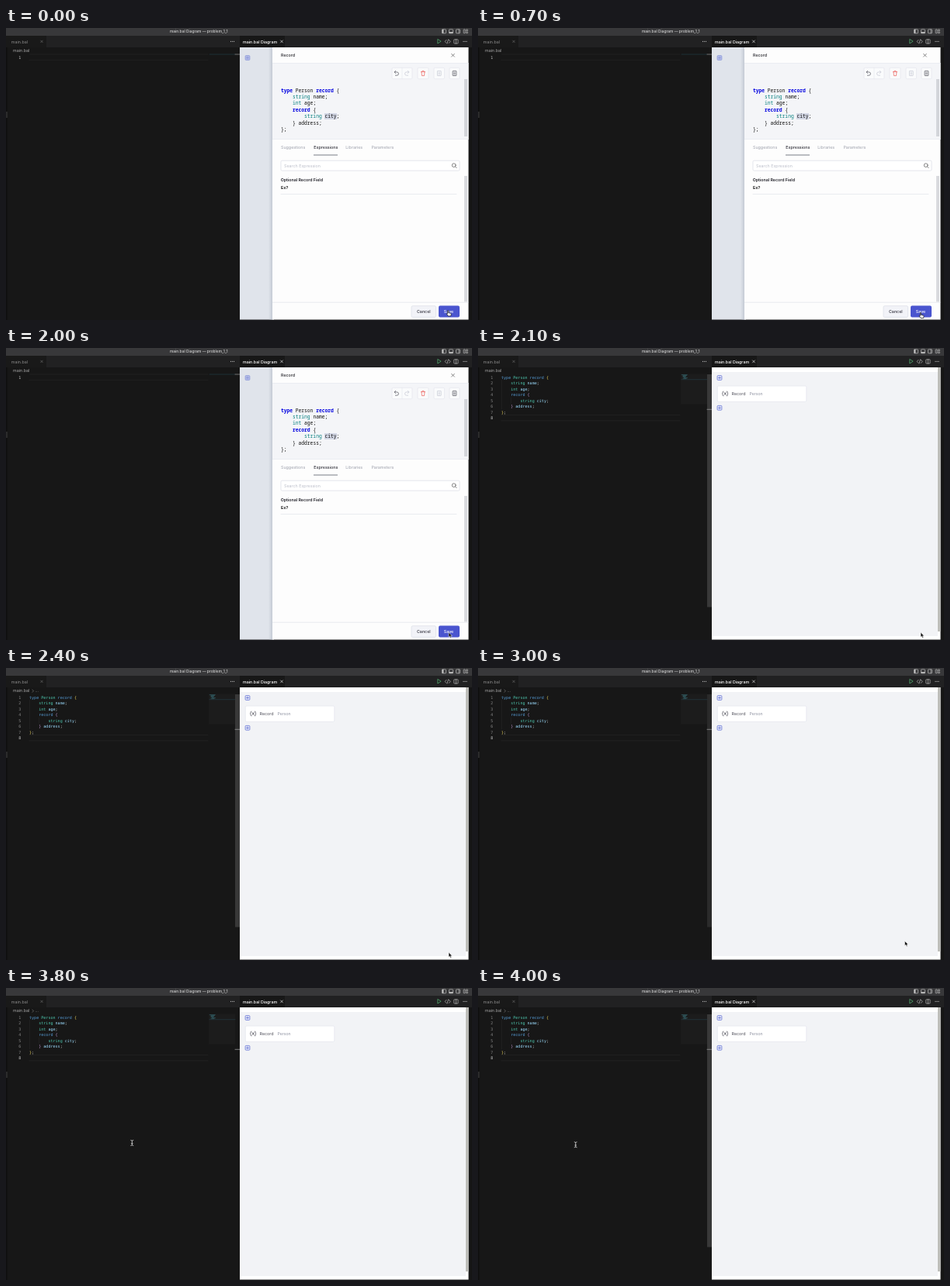
These frames come from a looping animation (600 by 377 pixels, 5200 ms). An HTML page:

```html
<!DOCTYPE html>
<html lang="en">
<head>
<meta charset="utf-8">
<title>Record editor</title>
<style>
html, body { margin: 0; width: 100%; height: 100%; overflow: hidden; background: #171717; }
svg { display: block; width: 100vw; height: 100vh; }
text { font-family: Inter, "Open Sans", sans-serif; font-size: 5.35px; white-space: pre; }
.mono { font-family: "DejaVu Sans Mono", monospace; font-size: 5.07px; }
.code { font-family: "Noto Sans Mono", monospace; font-size: 6.27px; font-weight: 500; }
.code .k { font-weight: 700; }
.med { font-weight: 500; }
.bold { font-weight: 600; }
.mid { text-anchor: middle; }
.line { fill: none; stroke-width: .7; stroke-linecap: round; stroke-linejoin: round; }
</style>
</head>
<body>
<svg viewBox="0 0 600 377" preserveAspectRatio="none">
  <defs><linearGradient id="shade"><stop stop-color="#c4cad4" stop-opacity="0"/><stop offset="1" stop-color="#c4cad4"/></linearGradient></defs>
  <g id="frame"></g>
  <g id="before"></g>
  <g id="after"></g>
  <g id="hand"><path d="M-1.6-3.4q.7-.6 1.2.2V-.6L2.3 0Q3.2.3 3 1.4L2.5 3.6H-.9L-2.8.7Q-2.7-.2-1.6.4Z" fill="#fff" stroke="#111" stroke-width=".7"/></g>
  <g id="arrow"><path d="M0 0V6L1.4 4.8 2.4 7 3.5 6.5 2.6 4.4H4.4Z" fill="#111" stroke="#fff" stroke-width=".5"/></g>
  <g id="beam"><path class="line" d="M-1.5-3.5Q0-3.4 0-2.5 0-3.4 1.5-3.5M0-2.5V2.5M-1.5 3.5Q0 3.4 0 2.5 0 3.4 1.5 3.5M-.9 .7H.9" stroke="#eee" stroke-width=".9"/></g>
</svg>
<script>
const $ = id => document.getElementById(id);
const rect = (x, y, w, h, fill, more = "") =>
  `<rect x="${x}" y="${y}" width="${w}" height="${h}" fill="${fill}" ${more}/>`;
const text = (x, y, s, fill, cls = "", more = "") =>
  `<text x="${x}" y="${y}" fill="${fill}" class="${cls}" ${more}>${s}</text>`;
const line = (d, color, width = .7) =>
  `<path class="line" d="${d}" stroke="${color}" style="stroke-width:${width}"/>`;
const box = (x, y, w, h, fill, edge, r = 1.5) =>
  rect(x, y, w, h, fill, `stroke="${edge}" stroke-width=".7" rx="${r}"`);
const cross = (x, y, r, color) =>
  line(`M${x - r} ${y - r}l${2 * r} ${2 * r}m0 ${-2 * r}l${-2 * r} ${2 * r}`, color);
const dots = (x, y, color) =>
  [-2, 0, 2].map(d => `<circle cx="${x + d}" cy="${y}" r=".55" fill="${color}"/>`).join("");
const plus = (x, y, color, fill) =>
  box(x - 2.9, y - 2.9, 5.8, 5.8, fill, color, 1) + line(`M${x - 1.4} ${y}h2.8m-1.4-1.4v2.8`, color);

// Each code line: indent, then colour key and text in turn
const program = [
  [0, "k", "type ", "t", "Person ", "k", "record ", "a", "{"],
  [4, "s", "string ", "v", "name", "p", ";"],
  [4, "s", "int ", "v", "age", "p", ";"],
  [4, "k", "record ", "b", "{"],
  [8, "s", "string ", "v", "city", "p", ";"],
  [4, "b", "} ", "v", "address", "p", ";"],
  [0, "a", "}", "p", ";"]
];
const dark = { k: "#569cd6", t: "#4ec9b0", a: "#e8cf5a", s: "#4ec9b0", v: "#9cdcfe", b: "#b58fc4", p: "#d4d4d4" };
const light = { k: "#0000e0", t: "#111", a: "#111", s: "#078080", v: "#111", b: "#111", p: "#111" };

function listing(x, y, step, charW, cls, colors) {
  return program.map(([indent, ...parts], i) => {
    let spans = "";
    for (let j = 0; j < parts.length; j += 2)
      spans += `<tspan class="${parts[j]}" fill="${colors[parts[j]]}">${parts[j + 1]}</tspan>`;
    return text(x + indent * charW, y + i * step, spans, "#111", cls);
  }).join("");
}

function drawFrame() {
  const c = "#bcbcbc";
  const pane = x => box(x - 2.5, 1.8, 5, 5, "none", c, .6);
  return rect(0, 0, 600, 10, "#38383a") +
    text(248.2, 6.2, "main.bal Diagram — problem_1_1", "#d2d2d2", "mid med", 'style="font-size:4.87px"') +
    [564, 573, 582].map(pane).join("") +
    rect(561.5, 1.8, 2, 5, c) + rect(570.5, 5, 5, 1.8, c) + line("M583 1.8v5", c) +
    box(589.2, 1.9, 2, 4.8, "none", c, .3) + box(592.6, 1.9, 1.8, 1.8, "none", c, .3) + box(592.6, 4.9, 1.8, 1.8, "none", c, .3) +
    rect(0, 10, 600, 15, "#212122") + rect(0, 10, 52, 15, "#191919") + rect(301, 10, 58, 15, "#171717") +
    text(6.8, 19.5, "main.bal", "#8c8c8c") + cross(46, 17.4, 1.3, "#666") + dots(291.5, 17.4, "#bbb") +
    text(305, 19.5, "main.bal Diagram", "#fff", "med", 'style="font-size:5.3px"') + cross(355, 17.4, 1.5, "#e0e0e0") +
    line("M555.8 14.8v5.2l4-2.6Z", "#58b878") +
    line("M567 15.4l-1.8 2 1.8 2m3.4-4l1.8 2-1.8 2M569.6 14.8l-1.6 5.2", c) +
    box(576.8, 14.8, 5.2, 5.2, "none", c, .5) + line("M579.4 14.8v5.2", c) + dots(591, 17.4, c) +
    text(9, 31.4, "main.bal", "#a8a8a8") +
    rect(0, 25, 1.5, 352, "#0f0f0f") + rect(0, 108, 2, 8, "#2b2b2b") +
    rect(596, 25, 4, 352, "#151515");
}

function drawBefore() {
  const ink = "#50505a", pale = "#c5c8d3", edge = "#e4e6ec";
  const tool = (x, w) => box(x, 51.3, w, 14.4, "#fafbfc", edge);
  const sheet = (x, color) => box(x - 2.4, 55.4, 4.8, 6.2, "none", color, .5) +
    line(`M${x - .9} 57.2h1.8m-1.8 1.4h1.8m-1.8 1.4h1.8`, color, .6);
  return text(19.3, 39.6, "1", "#c6c6c6", "mono", 'text-anchor="end"') +
    line("M30 34h230M30 41.3h230", "#282828", .6) +
    line("M262 34h33", "#24404b", .6) + line("M295 34h6", "#888", .8) +
    rect(301, 25, 44, 351.5, "#e0e4eb") + plus(311, 38.5, "#8794d8", "#b4bde8") +
    rect(338, 25, 5, 351.5, "url(#shade)") +
    rect(343, 25, 252.5, 351.5, "#fdfdfd") +
    text(354, 37.2, "Record", "#222228", "med") + cross(575.5, 35.2, 1.9, "#555") +
    rect(343, 45, 252.5, 99, "#f4f5f8") +
    line("M343.5 45.5H595M343.5 143.5H595", "#e6e8ee", .6) +
    tool(497, 26) + line("M510 51.3v14.4", edge, .6) +
    line("M501.8 55.2l-1.7 1.7 1.7 1.7m-1.5-1.7h3a2.1 2.1 0 0 1 0 4.3h-1.9", ink) +
    line("M517.2 55.2l1.7 1.7-1.7 1.7m1.5-1.7h-3a2.1 2.1 0 0 0 0 4.3h1.9", pale) +
    tool(530, 14) + line("M534.4 56.6h5.2m-4.6 0l.5 5h3l.5-5m-3-1.2h2", "#eb5a55") +
    tool(551, 13.5) + sheet(557.8, pale) + tool(571, 13) + sheet(577.5, ink) +
    rect(410, 110, 16, 8, "#d2d6e4") +
    listing(354, 82.7, 8.37, 3.762, "code", light) +
    rect(590, 66, 4, 74, "#d3d5da") + rect(590, 191, 4, 162.5, "#d9dade") +
    text(354, 156.2, "Suggestions", "#9da0ac") + text(396.3, 156.2, "Expressions", "#30303a", "med") +
    text(437.3, 156.2, "Libraries", "#9da0ac") + text(470.4, 156.2, "Parameters", "#9da0ac") +
    rect(396, 163.6, 31, .8, "#555b66") +
    box(354, 171.2, 230, 13, "#fff", "#d8dbe4") + text(358, 179.5, "Search Expression", "#bbbec9") +
    `<circle cx="576.7" cy="177.2" r="2.4" class="line" stroke="#555"/>` + line("M578.5 179l1.7 1.7", "#555") +
    text(353.7, 197.5, "Optional Record Field", "#202028", "bold", 'style="font-size:5.28px"') +
    text(354, 208.2, "Es?", "#222", "bold", 'style="font-family:\'Liberation Mono\',monospace;font-size:5.3px"') +
    line("M354 214.5H580", "#e3e5eb", .7) +
    line("M343.5 354.2H595", "#dfe1e8", .7) +
    box(522, 358.8, 31.5, 14.6, "#f2f3f8", "#dcdee7") + text(537.8, 368.1, "Cancel", "#33333e", "mid med") +
    rect(557, 358.5, 27, 15, "#4a55cf", 'rx="2"') + text(570, 368.1, "Save", "#fff", "mid med");
}

function drawAfter() {
  let numbers = "";
  for (let i = 1; i <= 8; i++)
    numbers += text(19.3, 39.6 + (i - 1) * 7.5, i, i < 8 ? "#858585" : "#c6c6c6", "mono", 'text-anchor="end"');
  return numbers + listing(30, 39.6, 7.5, 3.052, "mono", dark) +
    line("M42.4 64v7.5M30.4 41.5v37.5", "#2c2c2c", .5) +
    line("M30 86.4h230M30 93.9h230", "#282828", .6) +
    rect(261, 33.5, 34, 39, "#1c1c1c") +
    line("M262.3 34.6h7M264 35.6h4.5M264 36.6h3.5M264 37.6h3M265.5 38.6h4M264 39.6h4", "#3a7680", .55) +
    line("M262 40.7h33", "#24404b", .6) +
    rect(295, 34, 6, 300.5, "#383838", 'id="scroll"') + line("M295 79.3h6", "#999", .8) +
    `<g id="crumb">${line("M34 28l1.5 1.6-1.5 1.6", "#888", .6)}${text(37.5, 31.2, "...", "#a0a0a0")}</g>` +
    rect(301, 25, 294.5, 351.5, "#fff") + rect(301, 31, 291, 341, "#f2f3f6") +
    rect(592, 25, 3.5, 341, "#bdbdb9") +
    plus(311, 38.5, "#5868d2", "#e5e8f8") + plus(311, 77.3, "#5868d2", "#e5e8f8") +
    box(308.3, 49, 114.5, 20.4, "#fff", "#e2e4ec") +
    line("M316 56q-1 0-.9 1.3 0 1.3-.8 1.6.8.3.8 1.6-.1 1.4.9 1.4M320.4 56q1 0 .9 1.3 0 1.3.8 1.6-.8.3-.8 1.6.1 1.4-.9 1.4M317.2 57.6l2 2.8m0-2.8l-2 2.8", "#3d3d48") +
    text(326.6, 60.9, "Record", "#4a4a55") + text(349.4, 60.9, "Person", "#8d91a0", "", 'style="font-size:5.2px"');
}

$("frame").innerHTML = drawFrame();
$("before").innerHTML = drawBefore();
$("after").innerHTML = drawAfter();

// Pointer stops: time, x, y
const path = [
  [0, 570.2, 368.3], [300, 571, 371], [1800, 571, 371],
  [1900, 570, 367.3], [2700, 570, 367.3], [2900, 562, 361.5], [3000, 549.5, 352.5],
  [3200, 425, 290], [3300, 383.5, 270], [3600, 383.5, 270], [3700, 255, 215],
  [3800, 162.3, 200], [3900, 133, 202], [4000, 125.7, 202.3], [5200, 125.7, 202.3]
];

function pointerAt(t) {
  const i = path.findIndex(p => p[0] > t);
  const [t0, x0, y0] = path[i - 1], [t1, x1, y1] = path[i];
  const k = (t - t0) / (t1 - t0);
  return [x0 + (x1 - x0) * k, y0 + (y1 - y0) * k];
}

const show = (id, on) => $(id).style.display = on ? "" : "none";

function draw(now) {
  const t = Math.floor(now % 5200 / 100) * 100;
  const saved = t >= 2100;
  show("before", !saved);
  show("after", saved);
  show("crumb", t >= 2400);
  $("scroll").style.opacity = t >= 3900 ? 1 : Math.max(0, Math.min(1, (3300 - t) / 500));
  const [x, y] = pointerAt(t);
  const kind = t < 1900 ? "hand" : x > 301 ? "arrow" : "beam";
  for (const id of ["hand", "arrow", "beam"]) show(id, id === kind);
  $(kind).setAttribute("transform", `translate(${x} ${y})`);
  requestAnimationFrame(draw);
}
draw(performance.now());
</script>
</body>
</html>
```
